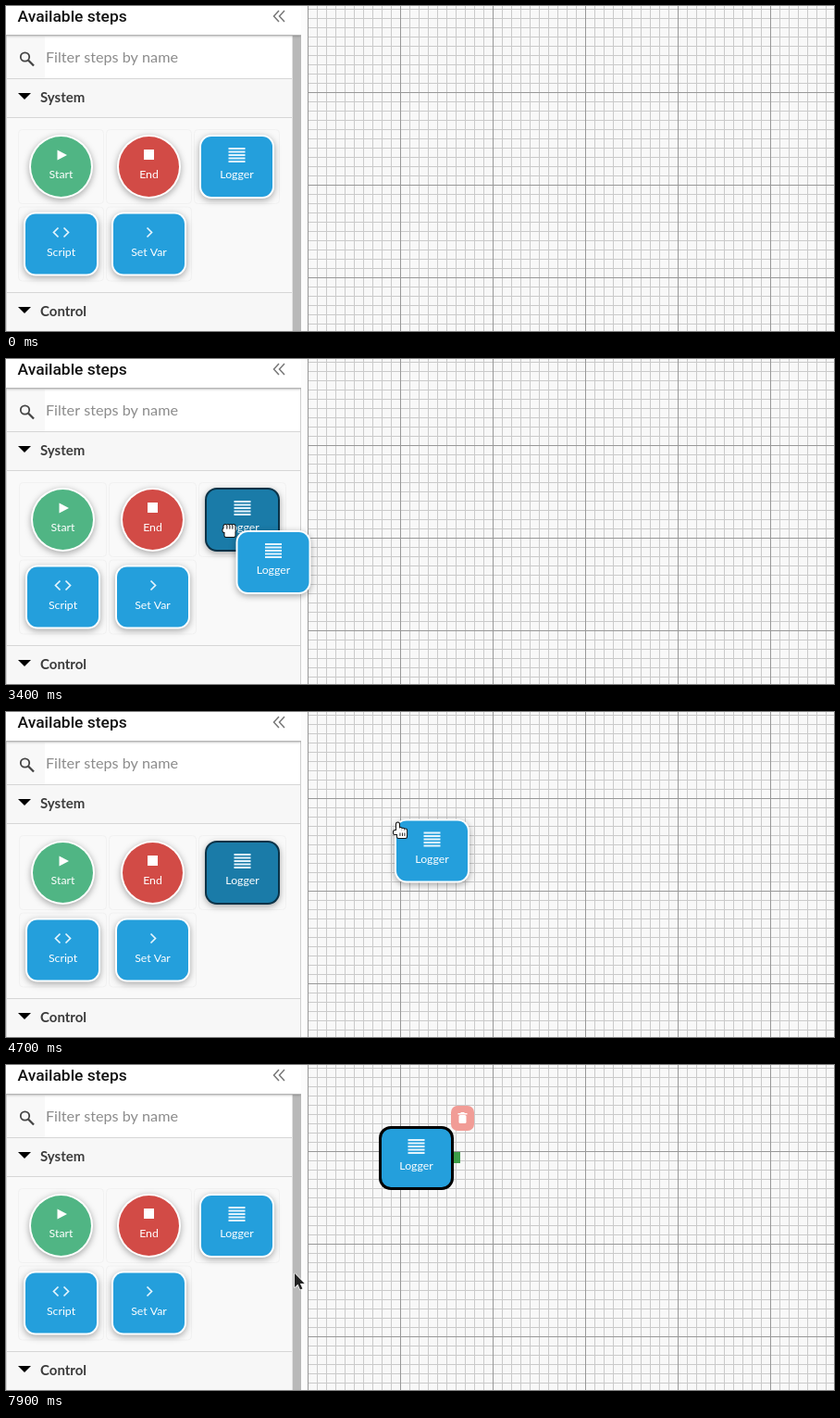
An HTML page with a canvas that plays this animation: 895 px wide and 351 px high, repeating every 8000 ms.

```html
<!DOCTYPE html>
<html lang="en">
<head>
<meta charset="utf-8">
<title>Step editor</title>
<style>
  html, body { margin: 0; width: 100%; height: 100%; overflow: hidden; background: #fff; }
  canvas { display: block; }
</style>
</head>
<body>
<canvas id="stage" width="895" height="351"></canvas>
<script>
const ctx = document.getElementById('stage').getContext('2d');
const W = 895, H = 351, LOOP = 8000, TICK = 100;
const BLUE = '#249fdc', DARK_BLUE = '#1a7ba8', GREEN = '#50b584', RED = '#d24b46';
const UI = 'Lato, "Open Sans", sans-serif';

const DRAG = 3400, OVER_GRID = 4300, DROP = 5800, SELECT = 5900, REENTER = 6300, RELAYOUT = 6500;
const GRABBED = [228, 167], EDGE = [368, 180], RELEASED = [400, 66], PARKED = [401, 73];

// Pointer strokes: a time span and the control points of a Bezier curve.
const strokes = [
  { from: 800, to: 900, path: [[369, 324], [358, 304]] },
  { from: 1000, to: 1900, path: [[358, 304], [-80, 220], [-40, -120], [243, 170]] },
  { from: 2100, to: 2200, path: [[243, 170], GRABBED] },
  { from: 3300, to: 4200, path: [GRABBED, [246, 216], EDGE] },
  { from: 4200, to: 5100, path: [EDGE, [449, 127], RELEASED] },
  { from: 6200, to: REENTER, path: [RELEASED, PARKED] },
  { from: 7000, to: 7900, path: [PARKED, [381, 140], [311, 224]] }
];
const cardStroke = { from: OVER_GRID, to: 5100, path: [[430, 205], [483, 145.5], [445.5, 103.5]] };

function bezier(points, u) {
  if (points.length === 1) return points[0];
  const next = points.slice(1).map(([x, y], i) =>
    [points[i][0] + (x - points[i][0]) * u, points[i][1] + (y - points[i][1]) * u]);
  return bezier(next, u);
}

function along({ from, to, path }, t) {
  const u = Math.min(1, Math.max(0, (t - from) / (to - from)));
  return bezier(path, u).map(v => Math.round(v * 2) / 2);
}

const pointerAt = t => along(strokes.filter(s => s.from <= t).pop() || strokes[0], t);

function cardAt(t) {
  if (t >= DROP) return [443.5, 100.5];
  if (t >= OVER_GRID) return along(cardStroke, t);
  const [x, y] = pointerAt(t);
  return [x + 55.5, y + 42.5];
}

function rect(x, y, w, h, color) {
  ctx.fillStyle = color;
  ctx.fillRect(x, y, w, h);
}

function round(x, y, w, h, r, color) {
  ctx.beginPath();
  ctx.roundRect(x, y, w, h, r);
  ctx.fillStyle = color;
  ctx.fill();
}

function text(str, x, y, font, color, align = 'left') {
  ctx.font = font;
  ctx.fillStyle = color;
  ctx.textAlign = align;
  ctx.fillText(str, x, y);
}

function line(points, color, width) {
  ctx.beginPath();
  points.forEach(([x, y]) => ctx.lineTo(x, y));
  ctx.strokeStyle = color;
  ctx.lineWidth = width;
  ctx.stroke();
}

function poly(points, fill) {
  ctx.beginPath();
  points.forEach(([x, y]) => ctx.lineTo(x, y));
  ctx.closePath();
  ctx.fillStyle = fill;
  ctx.fill();
}

function withShadow(alpha, blur, dy, draw) {
  ctx.save();
  ctx.shadowColor = `rgba(0,0,0,${alpha})`;
  ctx.shadowBlur = blur;
  ctx.shadowOffsetY = dy;
  draw();
  ctx.restore();
}

const chevron = (x, y, dir, size) =>
  line([[x - dir * size / 2, y - size], [x + dir * size / 2, y], [x - dir * size / 2, y + size]],
    '#e4f4fd', 1.7);

const icons = {
  Start(x, y) { poly([[x - 4, y - 5.5], [x + 6.5, y], [x - 4, y + 5.5]], '#fff'); },
  End(x, y) { rect(x - 5.5, y - 6, 11, 11, '#fff'); },
  Logger(x, y) {
    for (let i = 0; i < 5; i++) rect(x - 9, y - 8 + i * 3.5, 18, 2, '#e4f4fd');
  },
  Script(x, y) {
    chevron(x - 5.5, y, -1, 5);
    chevron(x + 5.5, y, 1, 5);
  },
  'Set Var'(x, y) { chevron(x + .5, y, 1, 5); }
};

const fills = { Start: [GREEN, '#3d8c66'], End: [RED, '#a23a36'] };

function step(name, x, y, { hover = false, lifted = hover, selected = false } = {}) {
  const circle = name in fills;
  const [plain, dark] = fills[name] || [BLUE, DARK_BLUE];
  const w = circle ? 69 : 81, h = 69, r = circle ? 34.5 : 13;
  const border = selected ? 3 : 2;
  const edge = selected ? '#000' : hover ? '#0b3247' : '#fff';
  const outer = () => round(x - w / 2, y - h / 2, w, h, r, edge);
  if (lifted) withShadow(.38, 14, 4, outer);
  else if (selected) outer();
  else withShadow(.34, 7, 2, outer);
  round(x - w / 2 + border, y - h / 2 + border, w - 2 * border, h - 2 * border, r - border,
    hover ? dark : plain);
  icons[name](x, y - 12.5);
  text(name, x, y + 12.5, '12.3px ' + UI, '#fff', 'center');
}

function steps(wide) {
  const first = wide ? 61.5 : 59.5, gap = wide ? 97 : 95;
  return ['Start', 'End', 'Logger', 'Script', 'Set Var'].map((name, i) =>
    ({ name, x: first + (i % 3) * gap, y: i < 3 ? 173.5 : 257 }));
}

function drawGrid() {
  rect(319, 0, 7, H, '#fcfcfc');
  rect(326, 0, W - 326, H, '#f8f8f8');
  for (const [gap, color] of [[10, '#cacaca'], [100, '#989898']]) {
    for (let x = 326; x < W; x += gap) rect(x, 0, 1, H, color);
    for (let y = 93 % gap; y < H; y += gap) rect(326, y, W - 326, 1, color);
  }
}

function section(name, y, right) {
  rect(0, y, right, 43, '#f7f7f7');
  rect(0, y, right, 1, '#d6d6d6');
  rect(0, y + 42, right, 1, '#d6d6d6');
  poly([[13, y + 16], [27, y + 16], [20, y + 23]], '#000');
  text(name, 37, y + 26, 'bold 15px ' + UI, '#3c3c3c');
}

function drawSearch(right) {
  rect(0, 34, 42, 44, '#f8f8f8');
  rect(42, 33, right - 42, 45, '#fff');
  ctx.beginPath();
  ctx.arc(20.5, 55, 4.7, 0, 2 * Math.PI);
  ctx.strokeStyle = '#444';
  ctx.lineWidth = 1.8;
  ctx.stroke();
  line([[24, 58.5], [30, 64.5]], '#444', 2.3);
  text('Filter steps by name', 43, 61, '16.2px ' + UI, '#8c8c8c');
}

function drawHeader() {
  withShadow(.4, 3, 1, () => rect(0, 0, 319, 31, '#fff'));
  rect(0, 31, 319, 1, '#b5b5b5');
  text('Available steps', 12.5, 17, '500 17.4px Roboto, sans-serif', '#111');
  for (const x of [289.5, 295.5])
    line([[x + 5.5, 5], [x, 11], [x + 5.5, 17]], '#777', 1.5);
}

function drawSidebar(wide, hovered, lifted) {
  const right = wide ? 318 : 309, half = wide ? 47 : 46;
  rect(0, 31, 319, H, '#f9f9f9');
  drawSearch(right);
  section('System', 78, right);
  ctx.strokeStyle = '#f1f1f1';
  ctx.lineWidth = 1;
  for (const { x, y } of steps(wide)) {
    ctx.beginPath();
    ctx.roundRect(x - half, y - 40, 2 * half, 80, 4);
    ctx.stroke();
  }
  for (const { name, x, y } of steps(wide)) {
    const hover = name === hovered;
    step(name, x, y, { hover, lifted: hover && lifted });
  }
  section('Control', 309, right);
  rect(0, 31, 1, H, '#d4d4d4');
  if (wide) rect(318, 31, 1, H, '#d0d0d0');
  else {
    rect(309, 31, 1, H, '#e2e2e2');
    rect(310, 31, 9, H, '#b9b9b9');
  }
  drawHeader();
}

function drawTooltip() {
  withShadow(.4, 6, 3, () => rect(243, 185, 342, 26, '#c8c8c8'));
  rect(244, 186, 340, 24, '#2d2d2d');
  text('Logger: Logs a message about application events.', 251, 202,
    '13px "DejaVu Sans", sans-serif', '#fff');
}

function drawSelection() {
  rect(484, 94, 7, 12, '#3c9c47');
  round(481, 44, 25, 27, 7, '#f19c96');
  round(489.5, 54, 8, 9, 1.5, '#fff');
  rect(488.5, 52, 10, 1.5, '#fff');
  rect(491.5, 51, 4, 1, '#fff');
}

// A hand is a union of rounded boxes: a dark, grown copy below a white one.
function drawHand(closed) {
  const boxes = closed
    ? [[3, 7, 11, 8], [1, 6, 4, 4]]
    : [[4, 1, 3, 12], [5, 10, 10, 7.5], [1, 9.5, 5, 4]];
  const fingers = closed ? 4 : 3;
  for (let i = 0; i < fingers; i++)
    boxes.push(closed ? [2 + 3 * i, 2, 3, 8] : [7 + 2.7 * i, 6.5 + .8 * i, 2.7, 7]);
  for (const [grow, color] of [[1, '#111'], [0, '#fff']])
    for (const [x, y, w, h] of boxes)
      round(x - grow, y - grow, w + 2 * grow, h + 2 * grow, 1.5 + grow, color);
  for (let i = 0; i < 3; i++)
    rect(closed ? 5 + 3 * i : 7.5 + 2.5 * i, closed ? 3 : 12, .9, 3.5, '#111');
}

function drawArrow() {
  ctx.lineJoin = 'round';
  const outline = [[1, 1], [1, 16], [4.5, 12.8], [7, 18.5], [9.3, 17.4], [6.9, 12], [11.5, 12], [1, 1]];
  line(outline, '#eee', 1.8);
  poly(outline, '#222');
}

function drawPointer(kind, x, y) {
  ctx.save();
  ctx.translate(x, y);
  if (kind === 'arrow') drawArrow();
  else drawHand(kind === 'grab');
  ctx.restore();
}

function render(t) {
  const [px, py] = pointerAt(t);
  const [cx, cy] = cardAt(t);
  const over = ({ x, y }) => Math.abs(px + 5 - x) < 40 && Math.abs(py + 1 - y) < 34;
  const dragging = t >= DRAG && t < DROP;
  const wide = t >= DRAG && t < RELAYOUT;
  const pointed = t < DRAG && steps(false).find(over);
  const cardHover = t >= REENTER && over({ x: cx, y: cy });

  drawSidebar(wide, dragging ? 'Logger' : pointed && pointed.name, !dragging);
  drawGrid();
  if (t >= DRAG) {
    const selected = t >= SELECT;
    step('Logger', cx, cy, { hover: cardHover, selected });
    if (selected) drawSelection();
  }
  if (t >= 2400 && t < 3100) drawTooltip();
  if (t >= strokes[0].from) {
    const onCard = t >= OVER_GRID && t < REENTER;
    const kind = dragging && !onCard ? 'grab' : pointed || cardHover || onCard ? 'hand' : 'arrow';
    drawPointer(kind, px, py);
  }
}

function frame() {
  const t = performance.now() % LOOP;
  render(Math.floor(t / TICK) * TICK);
  requestAnimationFrame(frame);
}
frame();
</script>
</body>
</html>
```
